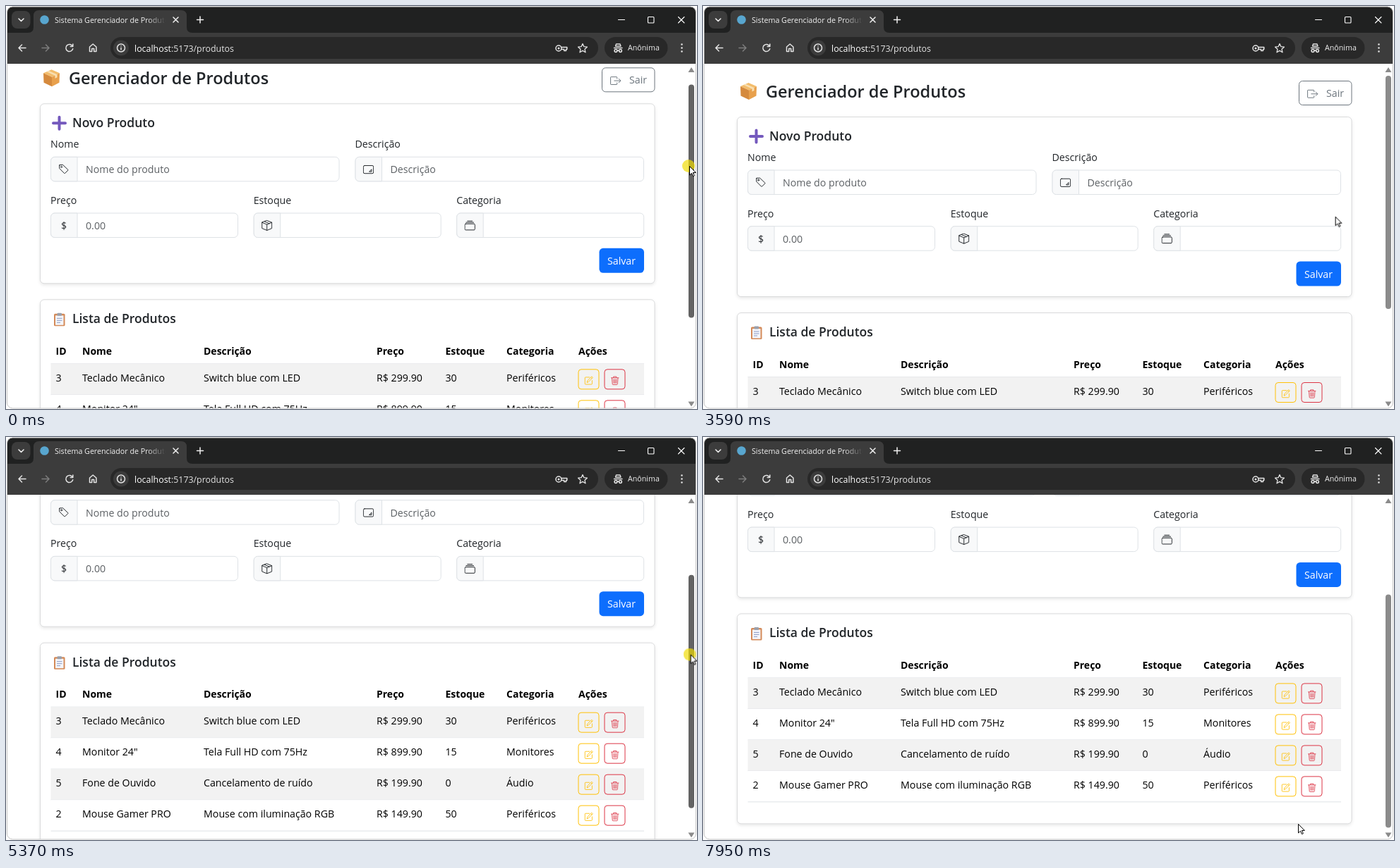
Recreate the animation shown at these times as an HTML page. Size 979x572 px, loop 8 s.

```html
<!DOCTYPE html>
<html lang="pt-BR">
<head>
<meta charset="utf-8">
<title>Gerenciador de Produtos</title>
<style>
@property --scroll { syntax: "<number>"; inherits: true; initial-value: 0; }
html, body { margin: 0; width: 100%; height: 100%; overflow: hidden; background: #fff; }
svg { display: block; }
text { font: 14.2px "Open Sans", "Noto Sans", sans-serif; fill: #212529; }
.h2 { font-size: 23.5px; font-weight: 600; }
.h5 { font-size: 17.5px; font-weight: 600; }
.th { font-size: 14px; font-weight: 700; fill: #000; }
.td { fill: #000; }
.hint { fill: #5c6064; }
.white { fill: #fff; }
.mid { text-anchor: middle; }
.url { font-size: 12.4px; fill: #e3e3e3; }
.line { fill: none; stroke: currentColor; stroke-linecap: round; stroke-linejoin: round; }
.box { fill: #fff; stroke: #dee2e6; }
.card { fill: #fff; stroke: #d9dadb; }
.soft { filter: drop-shadow(0 2px 2px rgba(0,0,0,.09)); }
.deep { filter: drop-shadow(0 7px 7px rgba(0,0,0,.17)); }

#win { animation: scroll 8s linear infinite; }
#page { transform: translateY(calc(var(--scroll) * -1px)); }
#thumb { transform: translateY(calc(var(--scroll) * .675px)); animation: thumb 8s step-end infinite; }
#cursor { animation: cursor 8s ease-in-out infinite; }
#press { animation: press 8s step-end infinite; }
#bar { animation: bar 8s step-end infinite; }
#buttons { animation: buttons 8s step-end infinite; }
.login { animation: login 8s step-end infinite; }
.prod { animation: prod 8s step-end infinite; }

@keyframes scroll {
  0%, .75% { --scroll: 18.7; animation-timing-function: ease-out; }
  6.25%, 61% { --scroll: 0; }
  64% { --scroll: 93.4; }
  68.625% { --scroll: 167; }
  70.125% { --scroll: 184.2; }
  71%, 100% { --scroll: 184.6; }
}
@keyframes cursor {
  0%, .75% { transform: translate(968px, 227px); animation-timing-function: ease-out; }
  6.25%, 9.49% { transform: translate(967px, 214px); animation-timing-function: step-end; }
  9.5%, 11.25% { transform: translate(490px, 446px); }
  14.25%, 24.4% { transform: translate(488px, 441px); animation-timing-function: step-end; }
  24.5%, 37.125% { transform: translate(492px, 441px); animation-timing-function: cubic-bezier(.4,0,.7,.9); }
  44.875% { transform: translate(895px, 299px); animation-timing-function: ease-out; }
  46.375%, 47.25% { transform: translate(939px, 275px); }
  55.125%, 61% { transform: translate(967px, 212px); animation-timing-function: linear; }
  64% { transform: translate(971px, 276px); animation-timing-function: linear; }
  68.625% { transform: translate(969px, 324px); animation-timing-function: linear; }
  70.125% { transform: translate(966px, 336px); animation-timing-function: ease-out; }
  75.625%, 89.75% { transform: translate(966px, 347px); }
  99.375%, 100% { transform: translate(843px, 549px); }
}
@keyframes thumb { 0%, 50.625% { fill: #636363; } 9.5%, 91.875% { fill: #8b8b8b; } }
@keyframes press {
  0%, 21.25%, 59.25% { visibility: visible; }
  8%, 24.5%, 83.375% { visibility: hidden; }
}
@keyframes bar { 0%, 21.25% { fill: #202121; } 9.5% { fill: #2b2b2b; } }
@keyframes buttons { 0%, 21.25% { color: #fff; } 9.5% { color: #858585; } }
@keyframes login { 0%, 24.5% { visibility: hidden; } 9.5% { visibility: visible; } }
@keyframes prod { 0%, 24.5% { visibility: visible; } 9.5% { visibility: hidden; } }
</style>
</head>
<body>
<svg width="979" height="572" viewBox="0 0 979 572">
<defs>
  <clipPath id="frame"><rect x="1.5" y="1" width="976" height="570" rx="8"/></clipPath>
  <clipPath id="view"><rect x="2" y="82" width="975" height="489"/></clipPath>
  <linearGradient id="fade" gradientUnits="userSpaceOnUse" x1="200" x2="226">
    <stop stop-color="#f0f0f0"/><stop offset="1" stop-color="#f0f0f0" stop-opacity="0"/>
  </linearGradient>

  <symbol id="tag" viewBox="0 0 16 16"><g class="line">
    <path d="M1.5 2v4.6l7.2 7.3q.4.4.8 0L14 9.4q.4-.4 0-.8L6.6 1.5H2q-.5 0-.5.5z"/><circle cx="4.5" cy="4.5" r="1"/></g></symbol>
  <symbol id="note" viewBox="0 0 16 16"><g class="line">
    <rect x=".6" y="2.5" width="14.8" height="11.6" rx="1.8"/><path d="M12.6 8.4v3.1H9.5z"/></g></symbol>
  <symbol id="cube" viewBox="0 0 16 16"><g class="line">
    <path d="M8 .8 15.2 3.6v8.6L8 15.2.8 12.2V3.6zM.8 3.6 8 6.6l7.2-3M8 6.6v8.6M4.4 2.2l7.2 3"/></g></symbol>
  <symbol id="stack" viewBox="0 0 16 16"><g class="line">
    <rect x=".6" y="5.6" width="14.8" height="9" rx="1.4"/><path d="M2.5 3.5h11M4.5 1.5h7"/></g></symbol>
  <symbol id="edit" viewBox="0 0 16 16"><g class="line">
    <path d="M9 2.5H2.5q-1 0-1 1v10q0 1 1 1h10q1 0 1-1V8M13 1.5l1.6 1.6-7.5 7.5-2.3.7.7-2.3zM11.5 3l1.6 1.6"/></g></symbol>
  <symbol id="trash" viewBox="0 0 16 16"><g class="line">
    <path d="M1.8 3.5h12.4M5.5 3V1.5h5V3M3 4l.8 10q.1 1 1 1h6.4q.9 0 1-1L13 4M5.7 6l.3 6.5M8 6v6.5M10.3 6l-.3 6.5"/></g></symbol>
  <symbol id="exit" viewBox="0 0 16 16"><g class="line">
    <path d="M10 5V3q0-.6-.6-.6H1.2Q.6 2.400.6 3v10q0 .6.6.6h8.200q.6 0 .6-.6v-2M6 8h9.400M12.600 5.200 15.400 8l-2.800 2.800"/></g></symbol>
  <symbol id="user" viewBox="0 0 16 16"><path fill="currentColor" d="M8 .8a3.500 3.500 0 0 1 0 7a3.500 3.500 0 0 1 0-7zM1.200 14q0-5.200 6.800-5.200t6.800 5.200q0 1-1 1H2.200q-1 0-1-1z"/></symbol>
  <symbol id="lock" viewBox="0 0 16 16"><path class="line" stroke-width="1.800" d="M4.800 8V4.200a3.200 3.200 0 0 1 6.400 0V8"/><rect x="1.800" y="6.800" width="12.400" height="9" rx="1.800" fill="currentColor"/></symbol>
</defs>

<g id="win" clip-path="url(#frame)">
  <rect width="979" height="572" fill="#fff"/>

  <g clip-path="url(#view)">
    <g class="prod">
      <g id="page">
        <path fill="#f3bd6c" d="M64.500 109 76 114 65 119.500 53 114z"/>
        <path fill="#d58a3d" d="M53 114l12 5.500V133l-11.500-5.500z"/>
        <path fill="#e8a04c" d="M76 114l-11 5.500V133l10.500-5.500z"/>
        <path fill="#f8dfb2" d="M57.500 112l3-1.300 12 5.300v4l-3 1.400v-4z"/>
        <text class="h2" x="89" y="129.500">Gerenciador de Produtos</text>
        <rect x="844.500" y="106.500" width="74.500" height="34" rx="5" fill="#fff" stroke="#6c757d"/>
        <use href="#exit" x="856" y="117" width="15.500" height="15.500" color="#6c757d"/>
        <text x="883" y="129" style="fill:#6c757d">Sair</text>

        <rect class="card soft" x="48.500" y="157.500" width="870.500" height="255" rx="5.500"/>
        <path d="M75.500 176.500v17M67 185h17" stroke="#7459bd" stroke-width="4" stroke-linecap="round"/>
        <text class="h5" x="94" y="191">Novo Produto</text>
        <g id="fields"></g>
        <rect x="840.500" y="362.500" width="63.500" height="35" rx="5.500" fill="#0d6efd"/>
        <text class="white mid" x="872" y="385.500">Salvar</text>

        <rect class="card soft" x="48.500" y="435.500" width="870.500" height="298" rx="5.500"/>
        <rect x="68" y="455.500" width="15.500" height="17.500" rx="1.500" fill="#d48a58"/>
        <rect x="70" y="458" width="11.500" height="13.500" fill="#f4f5fa"/>
        <rect x="72.500" y="454.500" width="6.500" height="4" rx="1" fill="#9aa0ac"/>
        <path d="M72 462h7.500M72 465h7.500M72 468h5" stroke="#8a9bc4"/>
        <text class="h5" x="94" y="469">Lista de Produtos</text>
        <g id="table"></g>
      </g>
      <path d="M971 87l4.500 7h-9zM971 568.500l4.500-7h-9z" fill="#8b8b8b"/>
      <rect id="thumb" x="967" y="99" width="8" height="331" rx="4"/>
    </g>

    <g class="login">
      <rect class="card deep" x="356.500" y="184.500" width="267" height="285" rx="5.500"/>
      <text class="h2 mid" x="490.500" y="225">Acesso ao sistema</text>
      <g id="access"></g>
      <text x="421.500" y="305.500">conta@vubo.org.br</text>
      <path d="M424.500 380.500h92" stroke="#212529" stroke-width="4.200" stroke-linecap="round" stroke-dasharray="0 6.080"/>
      <rect x="372" y="419" width="237" height="35" rx="5.500" fill="#0b5ed7"/>
      <text class="white mid" x="490.500" y="443">Entrar</text>
    </g>
  </g>

  <rect id="bar" width="979" height="39"/>
  <path fill="#3c3c3c" d="M0 38h31q8 0 8-8V14q0-8 8-8h201q8 0 8 8v16q0 8 8 8h715v44H0z"/>
  <rect x="8" y="7" width="26.500" height="25" rx="8" fill="#3c3c3c"/>
  <circle cx="54.500" cy="19.500" r="6.300" fill="#58a6cf"/>
  <text x="69" y="23.500" fill="url(#fade)" style="font-size:10.700px;fill:url(#fade)">Sistema Gerenciador de Produtos</text>
  <g class="line" color="#f0f0f0" stroke-width="1.500">
    <path d="M18 18l3.500 3.500L25 18M237 16l7 7M244 16l-7 7M275 15v9M270.500 19.500h9"/>
  </g>
  <g id="buttons" class="line" stroke-width="1.100">
    <path d="M867.500 19.500h9M952.500 15.500l8.500 8.500M961 15.500l-8.500 8.500"/><rect x="909.500" y="15.500" width="8.500" height="8.500" rx="1"/>
  </g>

  <rect x="148" y="44" width="691" height="31" rx="15.500" fill="#282828"/>
  <rect x="848" y="44" width="89.500" height="31" rx="15.500" fill="#282828"/>
  <circle cx="163" cy="59.500" r="11" fill="#3c3c3c"/>
  <g class="line" color="#e3e3e3" stroke-width="1.500">
    <path d="M28 59.500H18M22.500 55 18 59.500l4.500 4.500"/>
    <path d="M51 59.500h10M56.500 55l4.500 4.500-4.500 4.500" stroke="#7d7d7d"/>
    <path d="M94.300 57.200a5 5 0 1 0 .4 3.600M94.800 54v3.600h-3.600"/>
    <path d="M118.500 64.500v-6.500l4.700-4 4.700 4v6.500h-3.200V60.500h-3v4z"/>
    <circle cx="163" cy="59.500" r="5.500"/><path d="M163 59.300v2.800M163 56.700v.1"/>
    <circle cx="783" cy="60" r="4"/><circle cx="783" cy="60" r=".8"/>
    <path d="M786.500 58.500h8.300v3h-1.300v2h-2.800v-2h-4"/>
    <path d="M817 53.500l1.900 4.200 4.500.5-3.400 3.100 1 4.500-4-2.400-4 2.400 1-4.500-3.400-3.100 4.500-.5z" stroke-width="1.300"/>
    <path d="M861.500 59.500h11.500M863.500 57l1-3h5.500l1 3zM866 63.500q1.300-1 2.500 0" stroke-width="1.400"/>
    <circle cx="864" cy="63.500" r="1.900"/><circle cx="870.500" cy="63.500" r="1.900"/>
    <path d="M957.500 54.500v.01M957.500 59.500v.01M957.500 64.500v.01" stroke-width="2.600"/>
  </g>
  <text x="881" y="63.300" style="font-size:10.700px;fill:#f0f0f0">Anônima</text>
  <text class="url prod" x="182" y="64.500"><tspan fill="#fff">localhost</tspan>:5173/produtos</text>
  <text class="url login" x="182" y="64.500"><tspan fill="#fff">localhost</tspan>:5173/login</text>
</g>
<rect x="1.500" y="1" width="976" height="570" rx="8" fill="none" stroke="#c4c4c4"/>

<g id="cursor">
  <circle id="press" cx="-1" r="9" fill="#f0dc00" fill-opacity=".68"/>
  <path class="prod" d="M.5.500V13l3-2.700 2 4.400 1.900-.9-2-4.300h3.900z" fill="#fff" stroke="#000"/>
  <g class="login" stroke="#000" stroke-linejoin="round">
    <path fill="#fff" d="M-1.200 1.700a1.200 1.200 0 0 1 2.400 0V6l4.300 1q1.500.4 1.500 2v3l-1.200 3.800H0l-3.300-5q-1.200-1.900.2-2.300l1.900 1.600z"/>
    <path fill="none" stroke-width=".8" d="M1.200 6v2.500M3.300 6.600v2M5.300 7.200v1.800"/>
  </g>
</g>
</svg>

<script>
const put = (id, html) => { document.getElementById(id).innerHTML = html; };
const text = (x, y, s, cls = "") => `<text class="${cls}" x="${x}" y="${y}">${s}</text>`;
const icon = (name, x, y, size = 15.5) =>
  `<use href="#${name}" x="${x - size / 2}" y="${y - size / 2}" width="${size}" height="${size}" color="#212529"/>`;

// Label above an input with an icon cell on its left
function field(x, y, w, label, name, hint = "") {
  const mark = name === "$" ? text(x + 19, y + 23, "$", "mid") : icon(name, x + 19, y + 17.5);
  return text(x, y - 13, label) +
    `<rect class="box" x="${x + .5}" y="${y}" width="${w}" height="34.5" rx="5.5"/>
     <path d="M${x + 38} ${y}v34.5h-32a5.500 5.500 0 0 1-5.500-5.500V${y + 5.5}a5.500 5.500 0 0 1 5.500-5.500z" fill="#f8f9fa" stroke="#dee2e6"/>` +
    mark + text(x + 50, y + 23, hint, "hint");
}

put("fields",
  field(63, 233, 408.5, "Nome", "tag", "Nome do produto") +
  field(494.5, 233, 408.5, "Descrição", "note", "Descrição") +
  field(63, 312.7, 265, "Preço", "$", "0.00") +
  field(350.7, 312.7, 265, "Estoque", "cube") +
  field(638.2, 312.7, 265, "Categoria", "stack"));

put("access",
  field(372, 282.3, 236.5, "E-mail", "user") +
  field(372, 362.3, 236.5, "Senha", "lock"));

const columns = [70.5, 108, 280, 525, 622.5, 709, 811];
const heads = ["ID", "Nome", "Descrição", "Preço", "Estoque", "Categoria", "Ações"];
const rows = [
  [3, "Teclado Mecânico", "Switch blue com LED", "R$ 299.90", 30, "Periféricos"],
  [4, "Monitor 24\"", "Tela Full HD com 75Hz", "R$ 899.90", 15, "Monitores"],
  [5, "Fone de Ouvido", "Cancelamento de ruído", "R$ 199.90", 0, "Áudio"],
  [2, "Mouse Gamer PRO", "Mouse com iluminação RGB", "R$ 149.90", 50, "Periféricos"]
];
const cells = (list, y, cls) => list.map((s, i) => text(columns[i], y, s, cls)).join("");
const action = (x, y, name, color) =>
  `<rect x="${x}" y="${y}" width="29" height="28" rx="4" fill="none" stroke="${color}"/>
   <use href="#${name}" x="${x + 8}" y="${y + 9}" width="13.5" height="13.5" color="${color}"/>`;

put("table", cells(heads, 513.5, "th") +
  `<path d="M63.500 526.500H904" stroke="#dee2e6"/>` +
  rows.map((row, i) => {
    const y = 526.5 + 44 * i;
    return `<rect x="63.500" y="${y}" width="840.500" height="44" fill="${i % 2 ? "#fff" : "#f2f2f2"}"/>
      <path d="M63.500 ${y + 44}H904" stroke="#dee2e6"/>` +
      cells(row, y + 25, "td") +
      action(811, y + 8, "edit", "#ffc107") + action(848, y + 8, "trash", "#dc3545");
  }).join(""));
</script>
</body>
</html>
```
